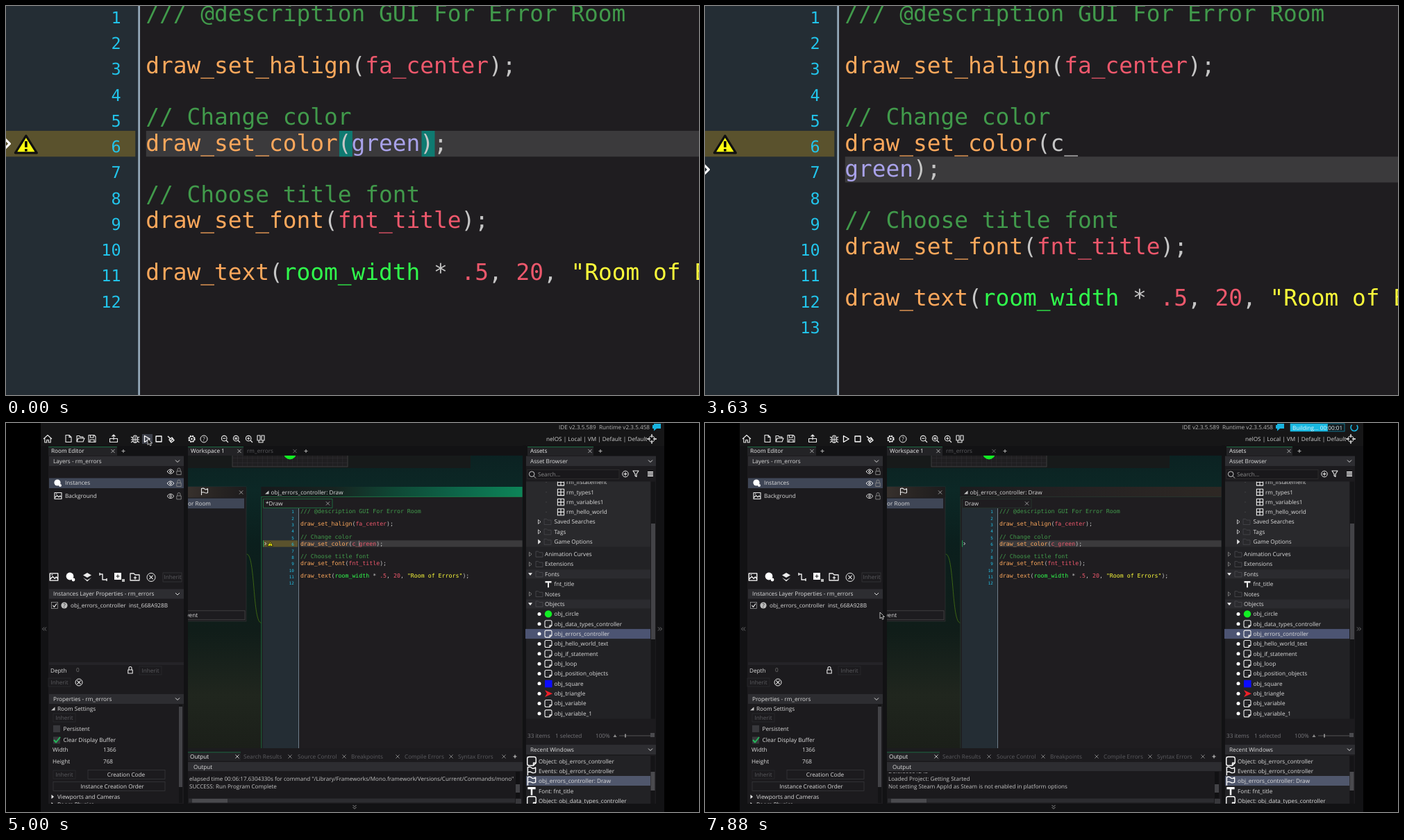
Recreate the animation shown at these times as an HTML page. Size 998 by 561 pixels, loop 8000 ms.

```html
<!DOCTYPE html>
<html lang="en">
<head>
<meta charset="utf-8">
<title>Code editor</title>
<style>
html, body { margin: 0; width: 100%; height: 100%; overflow: hidden; background: #000; }
svg { display: block; width: 998px; height: 561px; }
text { font: 8.2px "Open Sans", sans-serif; fill: #dcdcdc; white-space: pre; text-rendering: geometricPrecision; }
.code text { font: 8.26px "DejaVu Sans Mono", monospace; }
.code .num { font-size: 5.9px; fill: #22c5ec; text-anchor: end; }
.log text { font-size: 8.08px; fill: #c4c4c4; }
</style>
</head>
<body>
<svg id="stage" viewBox="0 0 998 561"></svg>
<script>
const LOOP = 8000, ZOOM = 3.975, PX = 498.7, PY = 165.7;
const ROW = 9.37, COL = 4.973, CODE_X = 424, CODE_Y = 129.65;
const DIM = '#5c5c60', PANEL = '#1c1b1e', HEAD = '#2d2d31', PICK = '#3f4656';

const esc = s => s.replace(/&/g, '&amp;').replace(/</g, '&lt;');
const rect = (x, y, w, h, fill, extra = '') => `<rect x="${x}" y="${y}" width="${w}" height="${h}" fill="${fill}" ${extra}/>`;
const label = (x, y, s, fill = '#dcdcdc', extra = '') => `<text x="${x}" y="${y + 2.9}" style="fill:${fill}" ${extra}>${esc(s)}</text>`;
const mid = (x, y, s, fill) => label(x, y, s, fill, 'text-anchor="middle"');
const icon = (x, y, d, color = '#ececec', w = 1.1, fill = 'none', size = 1) =>
  `<path transform="translate(${x} ${y}) scale(${size})" d="${d}" fill="${fill}" stroke="${color}" stroke-width="${w}" stroke-linejoin="round"/>`;
const solid = (x, y, d, color = '#ececec', size = 1) => icon(x, y, d, 'none', 0, color, size);
const dot = (x, y, r, fill) => `<circle cx="${x}" cy="${y}" r="${r}" fill="${fill}"/>`;
const ring = (x, y, r) => `<circle cx="${x}" cy="${y}" r="${r}" fill="none" stroke="#ececec"/>`;
const box = (x, y, w, h, stroke = '#3a3a3e', fill = 'none') => rect(x, y, w, h, fill, `stroke="${stroke}" stroke-width=".7"`);

const P = {
  close: 'M-2.6-2.6L2.6 2.6M2.6-2.6L-2.6 2.6',
  plus: 'M-2.5 0H2.5M0-2.5V2.5',
  down: 'M-3-1.5L0 1.5L3-1.5',
  open: 'M-3-1.6H3L0 2.2Z',
  shut: 'M-1.5-3L2-0L-1.5 3Z',
  folder: 'M-5 4V-4H-1.5L0-2.4H5V4Z',
  doc: 'M-4-5H1L4-2V5H-4ZM1-5V-2H4',
  disk: 'M-5-5H3L5-3V5H-5ZM-2.5-5V-1.5H2V-5M-3 5V1.5H3V5',
  lens: 'M2 2L5 5M3-.8A3.8 3.8 0 1 1-4.6-.8A3.8 3.8 0 1 1 3-.8',
  eye: 'M-5 0Q0-6.4 5 0Q0 6.4-5 0ZM-1.4 0A1.4 1.4 0 1 0 1.4 0A1.4 1.4 0 1 0-1.4 0',
  lock: 'M-3.2-.5H3.2V4.5H-3.2ZM-2-.5V-3A2 2 0 0 1 2-3V-.5',
  picture: 'M-5-4.5H5V4.5H-5ZM-5 3L-1.5-.5L1 2L3 0L5 2.5M-3-2.6H-1.6',
  grid: 'M-4.6-4.6H4.6V4.6H-4.6ZM0-4.6V4.6M-4.6 0H4.6',
  flag: 'M-4.5 5V-4.5Q-1.5-5.5 0-3.8T4.5-4.2V1.4Q2 2.6 0 1.4T-4.5 1.2',
  object: 'M-5-3Q-5-5-3-5H3Q5-5 5-3V2L2 5H-3Q-5 5-5 3ZM5 2H2V5',
  font: 'M-4.5-4.5H4.5V-2H1V4.8H-1V-2H-4.5Z',
  bubble: 'M-4-5H6V2H0L-4 5.5V2H-6V-3H-4Z'
};

function tab(x, w, s, closeX, active = true) {
  return (active ? rect(x, 34, w, 13, '#232326') + rect(x, 34, w, .8, '#1c7a48') : '') +
    label(x + 4, 40.5, s, active ? '#f0f0f0' : DIM) + icon(closeX, 40.5, P.close, active ? '#bbb' : '#777', .9);
}
function header(x, y, w, s, chevron) {
  return rect(x, y - 7, w, 14, HEAD) + label(x + 6, y, s) + icon(chevron, y, P.down, '#ddd', 1);
}

function toolbar() {
  let s = icon(60, 23, 'M-6 0L0-5.5L6 0M-4.2-1V5H-1.3V1.5H1.3V5H4.2V-1') + icon(90, 22.5, P.doc) +
    icon(107, 22.5, 'M-5 4.5V-4H-1.5L0-2.4H4V-.5M-5 4.5L-3-.5H6L4 4.5Z') + icon(124, 22.5, P.disk) +
    icon(155, 22.5, 'M-5.5 0V5H5.5V0ZM0 2V-5.5M-2.5-3L0-5.5L2.5-3') +
    icon(186, 23, 'M-3-1A3 4 0 0 1 3-1V2A3 3.5 0 0 1-3 2ZM-6-3L-3-1M6-3L3-1M-6 1H6M-6 5L-3 3M6 5L3 3M0-4V5') +
    icon(203, 23, 'M-3.5-4.5L4.2 0L-3.5 4.5Z', '#fff', 1.3) + icon(220, 23, 'M-4-4H4V4H-4Z', '#fff', 1.3) +
    icon(237, 23, 'M-4-4L0 0M-2 1L2-2L5 2L1 5ZM0 3L3 0', '#eee', 1.5);
  s += `<circle cx="267.5" cy="23" r="4.3" fill="none" stroke="#eee" stroke-width="1.8" stroke-dasharray="2.2 1.18"/>` + ring(267.5, 23, 3.6) + dot(267.5, 23, 1.3, '#eee');
  s += ring(285, 23, 5) + mid(285, 23, '?');
  [315, 332, 350].forEach((x, i) => s += icon(x, 23, P.lens) + icon(x - .8, 22.2, ['M-2 0H2', 'M-2-.7H2M-2 .9H2', 'M-2 0H2M0-2V2'][i]));
  s += icon(367, 23, 'M-5-5H-1V2H-5ZM1-5H5V2H1ZM-3 2V5H3V2');
  return s + label(778, 23, 'nelOS | Local | VM | Default | Default', '#cfcfcf') + ring(930, 23, 4.2) +
    icon(930, 23, 'M-7 0H-2M2 0H7M0-7V-2M0 2V7', '#eee', 1.3);
}

function leftPanel() {
  let s = rect(61, 47, 195, 502, PANEL) + tab(61, 99, 'Room Editor', 154) + icon(169, 40.5, P.plus, '#aaa') + header(62, 55, 194, 'Layers - rm_errors', 247);
  s += rect(62, 79.5, 194, 14.5, PICK) + dot(74, 86, 4.6, '#fff') + dot(78, 90, 2, '#fff') + label(85, 86.5, 'Instances') + icon(75, 105, P.picture) + label(85, 105.5, 'Background');
  for (const y of [70, 87, 105.5]) s += icon(237, y, P.eye, '#e4e4e4', 1) + icon(249, y, P.lock, '#8a8a8a', .9);
  s += icon(69, 222, P.picture, '#fff', 1.2, 'none', 1.15) + dot(92, 221, 5.4, '#fff') + dot(97, 226, 2.4, '#fff') +
    solid(117, 222, 'M0-6L6-2.5L0 1L-6-2.5ZM-6 1L0 4.5L6 1L0 6.5Z') + icon(140, 222, 'M-5-4H-1V4H5M-5-6V-2M5 2V6', '#eee', 1.4) +
    rect(156, 216, 10, 10, '#fff') + icon(161, 221, P.plus, '#222') + rect(167, 225, 4, 4, '#bbb') +
    icon(186, 222, 'M-7 5V-5H-2L0-3H6V5ZM0-1V3.5M-2.2 1.2H2.2', '#eee', 1.3) + ring(209, 222.5, 6) + icon(209, 222.5, P.close);
  s += box(226, 216, 27, 13) + mid(240, 222.5, 'Inherit', DIM);
  s += header(62, 246.5, 194, 'Instances Layer Properties - rm_errors', 247) + box(65.5, 258.5, 9, 9, '#aaa') + icon(70, 263, 'M-2.5 0L-.5 2.3L3-2.5', '#fff') +
    dot(84, 263, 4.6, '#bdbdbd') + mid(84, 263, '?', '#222') + label(93, 263, 'obj_errors_controller  inst_668A928B');
  s += rect(62, 345, 194, 4, '#242327') + label(64, 357, 'Depth') + label(101, 356.5, '0', '#777') + icon(179, 356.5, P.lock);
  [[208, 357], [77, 374], [84, 425], [84, 507]].forEach(([x, y]) => s += box(x - 16, y - 6, 32, 12, '#2c2c30') + mid(x, y, 'Inherit', DIM));
  s += ring(105, 374, 5) + icon(105, 374, P.close) + header(62, 398, 194, 'Properties - rm_errors', 247);
  s += icon(68, 412, 'M2.5-2.5V2.5H-3Z', 'none', 0, '#c4c4c4') + label(74, 412, 'Room Settings') + rect(68, 436, 10, 10, '#38383c') + label(82.5, 441, 'Persistent') +
    rect(68, 452.5, 10, 10, '#38383c') + icon(73, 457, 'M-4 0L-1 3.5L5-4', '#25b85a', 2) + label(82.5, 457.5, 'Clear Display Buffer') +
    label(67, 471, 'Width') + label(140, 471, '1366') + label(67, 488, 'Height') + label(140, 488, '768');
  s += box(118, 500.5, 111, 13) + mid(173, 507, 'Creation Code') + box(68, 517.5, 161, 13) + mid(153, 524, 'Instance Creation Order');
  s += solid(67, 539, P.shut) + label(74, 539, 'Viewports and Cameras') + `<g clip-path="url(#leftClip)">${solid(67, 550, P.shut)}${label(74, 550, 'Room Physics')}</g>`;
  return s + rect(249, 406, 5, 142, '#141416') + rect(249, 409, 5, 116, '#434347');
}

function rightPanel() {
  let s = rect(749, 47, 187, 502, PANEL) + tab(751, 95, 'Assets', 841) + icon(856, 40.5, P.plus, '#aaa') + header(749, 55, 187, 'Asset Browser', 928);
  s += box(751, 67.5, 132, 13, '#333', '#19181b') + icon(758, 74.5, P.lens, '#ddd', .9) + label(766, 74.5, 'Search...', '#8a8a8a') + ring(892, 73.5, 4.3) +
    icon(892, 73.5, P.plus) + icon(907, 73, 'M-4-4H4L1 .5V4.5L-1 3V.5Z') + icon(928, 73.5, 'M-4-2.8H4M-4 0H4M-4 2.8H4', '#fff', 1.5);
  s += rect(749, 84.5, 179, 342, '#222225') + rect(749, 84.5, 179, 94, '#29292c');
  let tree = '';
  ['rm_ifstatement', 'rm_types1', 'rm_variables1', 'rm_hello_world'].forEach((n, i) => {
    const y = 85.5 + i * 14.3;
    tree += dot(778, y, .5, '#666') + icon(799, y, P.grid) + label(807, y, n);
  });
  ['Saved Searches', 'Tags', 'Game Options'].forEach((n, i) => {
    const y = 142.5 + i * 14.4;
    tree += icon(768, y, P.shut, '#ddd', .8, i > 1 ? '#ddd' : 'none') + icon(780, y, P.folder, '#454549', .9) + label(789.5, y, n);
  });
  ['Animation Curves', 'Extensions', 'Fonts', '', 'Notes', 'Objects'].forEach((n, i) => {
    const y = 189.2 + i * 14.35, open = i === 2 || i === 5;
    if (!n) return;
    if (open) tree += rect(749, y - 6.5, 179, 13, '#2b2b2f');
    tree += (open ? solid(755, y, P.open) : icon(755, y, P.shut, '#888', .8)) + icon(768, y, P.folder, '#48484c', .9) + label(776, y, n);
  });
  tree += solid(781, 232.5, P.font) + label(789.5, 232.5, 'fnt_title');
  ['circle', 'data_types_controller', 'errors_controller', 'hello_world_text', 'if_statement', 'loop', 'position_objects', 'square', 'triangle', 'variable', 'variable_1'].forEach((n, i) => {
    const y = 275.4 + i * 14.35;
    if (i === 2) tree += rect(748, y - 7, 180, 14, '#4c5472');
    tree += dot(768, y, 2.5, '#fff');
    if (n === 'circle') tree += dot(781, y, 5.2, '#12ee24');
    else if (n === 'square') tree += rect(776, y - 5, 10.5, 10.5, '#0c0cff');
    else if (n === 'triangle') tree += solid(781, y, 'M-5-5L6 0L-5 5L-2 0Z', '#ee2028');
    else tree += icon(781, y, P.object, '#f0f0f0', 1.1);
    tree += label(789.5, y, 'obj_' + n);
  });
  s += `<g clip-path="url(#treeClip)">${tree}</g>` + rect(929, 84.5, 6, 342, '#141416') + rect(929, 145, 6, 167, '#434347');
  s += label(751, 451, '33 items', '#77777b') + label(791, 451, '1 selected', '#77777b') + label(849, 451, '100%', '#77777b') +
    icon(877, 451, 'M0-2L2.5 2H-2.5Z', 'none', 0, '#888') + rect(883, 450.5, 47, 1, '#555') + rect(891, 448.5, 2, 5, '#888') + rect(928, 447, 6, 6, '#4a4a4e');
  s += header(749, 471, 187, 'Recent Windows', 928) + rect(749, 480, 179, 69, '#222225') + rect(749, 509, 179, 14, '#50576c');
  let recent = '';
  [['object', 'Object: obj_errors_controller'], ['flag', 'Events: obj_errors_controller'], ['flag', 'obj_errors_controller: Draw'], ['font', 'Font: fnt_title'], ['object', 'Object: obj_data_types_controller']]
    .forEach(([k, n], i) => {
      const y = 487.8 + i * 14.3;
      recent += (k === 'font' ? solid(757, y, P.font, '#fff', 1.25) : icon(757, y, P[k], '#fff', 1.1, 'none', 1.25)) + label(767, y, n);
    });
  return s + `<g clip-path="url(#leftClip)">${recent}</g>` + rect(928.5, 480, 6, 69, '#141416') + rect(928.5, 503, 6, 27, '#4a4a4e');
}

function centre() {
  let s = rect(262, 47, 482, 422, 'url(#scene)');
  s += `<g clip-path="url(#workClip)">` + rect(262, 47, 407, 18, '#171a1a') + box(326, 40, 166, 23, '#4a4a4a', '#201f21');
  for (let i = 1; i < 23; i++) s += rect(326 + i * 7.2, 47, .35, 16, '#383639');
  s += rect(326, 50, 166, .35, '#383639') + rect(326, 57, 166, .35, '#383639') + dot(409, 43.5, 9, '#12ee24');
  s += rect(255, 92, 91, 194, '#1d1c1f', 'stroke="#343638" stroke-width=".6"') + rect(255, 92, 91, 15.5, 'url(#warm)') + rect(255, 108.7, 88, 14.5, PICK) +
    label(262, 116.5, 'or Room') + icon(286, 99, P.flag) + icon(338.6, 100, P.close, '#aaa', .9) + box(255, 270.8, 89, 12.9, '#4a4a4a') + label(259.5, 277.5, 'vent');
  s += `<path d="M346.7 189.2C359 189.2 355 288.2 367.6 288.2" fill="none" stroke="#4b7a12" stroke-width=".75"/></g>`;
  s += rect(367.6, 92, 376, 377, '#1f1d20') + rect(367.6, 92, 376, 14.3, 'url(#idle)') + `<g id="glow">${rect(367.6, 92, 376, 14.3, 'url(#green)')}</g>` +
    solid(376, 100, 'M2.5-2.5V2.5H-3Z', '#c4c4c4') + label(381.5, 100.5, 'obj_errors_controller: Draw') +
    `<g id="frame" fill="none" stroke-width=".6"><path d="M743.5 106.4H367.8V469"/><path d="M370.5 122.4V109.6H470V122.4H370.5"/></g>` +
    icon(463.5, 116, P.close, '#c4c4c4', .7) + `<g id="tabName"></g>`;
  s += rect(370, 123, 51.5, 346, '#242d34') + `<g id="code" class="code"></g>` + rect(421.1, 123, .7, 346, '#93a8b8');
  s += rect(744, 32, 5, 520, '#121214') + rect(262, 469, 482, 80, PANEL);
  s += tab(262, 80, 'Workspace 1', 336) + tab(343, 80, 'rm_errors', 416, false) + icon(432, 40.5, P.plus, '#aaa');
  s += rect(262, 475, 76, 12, '#232326') + rect(262, 474.5, 76, .8, '#1c7a48');
  [['Output', 265, 333], ['Search Results', 342, 409], ['Source Control', 420, 487], ['Breakpoints', 497, 564], ['Compile Errors', 574, 641], ['Syntax Errors', 651, 717]]
    .forEach(([n, x, c], i) => s += label(x, 481, n, i ? DIM : '#f0f0f0') + icon(c, 481, P.close, i ? '#888' : '#ccc', .9));
  s += icon(733, 481, P.plus, '#ccc') + rect(262, 489, 482, 13, HEAD) + label(270, 496, 'Output') + rect(262, 502, 482, 47, '#1b1a1d');
  s += `<g id="log" class="log" clip-path="url(#logClip)"></g>` + rect(734, 503, 6, 38, '#111113') + rect(734, 521, 6, 12, '#434347') + rect(734, 542, 8, 7, '#38383c') + rect(263, 541.5, 470, 6, '#2c2c30') + rect(268, 542, 51, 5.5, '#4a4a4e');
  return s;
}

const clip = (id, x, y, w, h) => `<clipPath id="${id}">${rect(x, y, w, h, '#fff')}</clipPath>`;
const grad = (id, dir, stops) => `<linearGradient id="${id}" x2="${dir ? 0 : 1}" y2="${dir}">` +
  stops.map(([o, c]) => `<stop offset="${o}" stop-color="${c}"/>`).join('') + '</linearGradient>';

const $ = id => document.getElementById(id);
$('stage').innerHTML = '<defs>' + clip('leftClip', 50, 400, 900, 149) + clip('treeClip', 748, 84.5, 180, 342) + clip('workClip', 262, 47, 482, 422) +
  clip('logClip', 263, 504, 469.5, 36) +
  grad('scene', 1, [[0, '#0b2222'], [.12, '#0c2826'], [.3, '#0b1f1d'], [.6, '#101d19'], [.82, '#20261e'], [1, '#1b1f19']]) +
  grad('green', 0, [[0, '#17191b'], [.28, '#172320'], [.5, '#0f4634'], [.75, '#0d6549'], [1, '#0d8558']]) +
  grad('idle', 0, [[0, '#1c1c1e'], [.4, '#242122'], [1, '#2e2824']]) +
  grad('warm', 0, [[0, '#3a332f'], [.5, '#292523'], [1, '#1d1c1d']]) + '</defs>' +
  rect(0, 0, 998, 561, '#000') + '<g id="world">' + rect(50, 0, 898, 561, '#121214') + rect(50, 0, 898, 33, '#161617') +
  '<g id="hover">' + rect(196, 16, 15, 14, '#3c3f49') + '</g>' + toolbar() + '<g id="status"></g>' + centre() + leftPanel() + rightPanel() +
  icon(55, 297, 'M0-2.5L-2.5 0L0 2.5M3-2.5L.5 0L3 2.5', '#888', .8) + icon(942, 297, 'M0-2.5L2.5 0L0 2.5M-3-2.5L-.5 0L-3 2.5', '#888', .8) +
  icon(502, 554, 'M-2.5-3L0-.5L2.5-3M-2.5 0L0 2.5L2.5 0', '#aaa', .8) +
  '<g id="mouse"></g></g>';

const INK = { f: '#fda85c', a: '#ee586c', p: '#c6c6c6', c: '#419a4b', v: '#a9a2ea', g: '#30fb4c', s: '#fbfb3a' };

// Each line is a list of [ink, text] pairs.
function codeLines(typed, split) {
  const call = (name, ...args) => [['f', name], ['p', '('], ...args, ['p', ');']];
  const word = typed + 'green';
  const colour = split
    ? [[['f', 'draw_set_color'], ['p', '(c_']], [['v', 'green'], ['p', ');']]]
    : [call('draw_set_color', [word === 'c_green' ? 'a' : 'v', word])];
  return [[['c', '/// @description GUI For Error Room']], [], call('draw_set_halign', ['a', 'fa_center']), [],
    [['c', '// Change color']], ...colour, [], [['c', '// Choose title font']], call('draw_set_font', ['a', 'fnt_title']), [],
    call('draw_text', ['g', 'room_width'], ['p', ' * '], ['a', '.5'], ['p', ', '], ['a', '20'], ['p', ', '], ['s', '"Room of Errors"']), []];
}

function drawCode(typed, split, match, warn, caret, edited) {
  const rowTop = r => 169.3 + (r - 5) * ROW, active = split ? 6 : 5, y = rowTop(active);
  let s = rect(CODE_X, y, 319.6, ROW, '#3b3a3c');
  if (warn) s += rect(370, rowTop(5), 50.1, ROW, '#5a522d');
  if (edited) s += rect(370, y, 1.1, ROW, '#1f9a50');
  if (match) for (const c of [14, 20]) s += rect(CODE_X + .35 + c * COL, y, COL - .2, ROW, '#0f7a71');
  if (warn) s += icon(380.5, rowTop(5) + 5, 'M0-3.2L3.9 3H-3.9Z', '#111', .8, '#ffff10') + icon(380.5, rowTop(5) + 5, 'M0-1.2V1M0 1.6V2.4', '#000', .9);
  s += icon(372.6, y + 4.7, 'M0-2L2 0L0 2', '#fff', .8);
  codeLines(typed, split).forEach((line, i) => {
    s += `<text class="num" x="414.9" y="${130.3 + i * ROW}">${i + 1}</text>`;
    if (line.length) s += `<text x="${CODE_X - .1}" y="${CODE_Y + i * ROW}">` + line.map(([k, v]) => `<tspan fill="${INK[k]}">${v}</tspan>`).join('') + '</text>';
  });
  if (caret) s += rect(CODE_X + (split ? 0 : (15 + typed.length) * COL), y + .4, .45, ROW - .8, '#e4e4e4');
  return s;
}

const LOGS = [
  ['', 'elapsed time 00:06:17.6304330s for command "/Library/Frameworks/Mono.framework/Versions/Current/Commands/mono"', 'SUCCESS: Run Program Complete'],
  ['Setting up the Asset compiler.', '/Users/Shared/GameMakerStudio2/Cache/runtimes/runtime-2.3.5.458/bin/GMAssetCompiler.exe  /c /mv=1 /zpex /iv=0 /rv=0 /j=8', 'config/GameMakerStudio2/Cache/GMS2CACHE/Getting_St_4A5739C1_807C5ABD"'],
  ['DoIt::00001243', 'Loaded Project: Getting Started', 'Not setting Steam AppId as Steam is not enabled in platform options']
];

function drawStatus(t, busy) {
  const x = busy ? 687 : 796;
  let s = label(x, 6.3, 'IDE v2.3.5.589  Runtime v2.3.5.458', '#b4b4b4') + solid(x + 141, 6, P.bubble, '#18b4e0');
  if (!busy) return s;
  const part = .12 + .57 * (t - 5250) / 2630;
  const sec = t < 7250 ? Math.floor((t - 5250) / 280) : Math.floor((t - 7250) / 420);
  s += box(843, 1, 78, 11, '#159dc2', '#121a1e') + rect(843, 1, 78 * part, 11, '#18b9e2') +
    label(846, 6.6, 'Building... 00:00:0' + sec, '#e6f4f8');
  return s + `<circle cx="935" cy="6.5" r="5" fill="none" stroke="#18b4e0" stroke-width="1.6" stroke-dasharray="23 8.4" transform="rotate(${t * .36} 935 6.5)"/>`;
}

const clamp = v => Math.min(1, Math.max(0, v));
const ease = v => v * v * (3 - 2 * v);
const phase = (t, a, b) => ease(clamp((t - a) / (b - a)));
const mix = (a, b, k) => a + (b - a) * k;

const IBEAM = icon(0, 0, 'M-10-17H-5Q0-17 0-12V12Q0 17-5 17H-10M10-17H5Q0-17 0-12M0 12Q0 17 5 17H10M-5 7H5', '#fff', 7) +
  icon(0, 0, 'M-9-17H-5Q0-17 0-12V12Q0 17-5 17H-9M9-17H5Q0-17 0-12M0 12Q0 17 5 17H9M-4 7H4', '#111', 2.8);
const ARROW = icon(0, 0, 'M0 0V9L2.1 7.1L3.6 10.3L5.2 9.6L3.8 6.5H6.4Z', '#e8e8e8', .8, '#0a0a0a');

function drawMouse(t) {
  if (t >= 380 && t < 2130) {
    const k = phase(t, 380, 1130);
    return `<g transform="translate(${mix(640, 498.2, k)} ${mix(205, 176.9, k)}) scale(${1 / ZOOM})">${IBEAM}</g>`;
  }
  if (t < 4750) return '';
  const a = phase(t, 4700, 4990), b = phase(t, 5250, 6000);
  return `<g transform="translate(${mix(mix(300, 204, a), 252, b)} ${mix(mix(85, 22.5, a), 273, b)})">${ARROW}</g>`;
}

const cache = {};
function put(id, html) {
  if (cache[id] !== html) $(id).innerHTML = cache[id] = html;
}

function render(t) {
  const z = mix(ZOOM, 1, phase(t, 4500, 5000));
  $('world').setAttribute('transform', `translate(${PX * (1 - z)} ${PY * (1 - z)}) scale(${z})`);
  const busy = t >= 5250, split = t >= 2750 && t < 3880;
  const typed = t < 2130 ? '' : t < 2380 ? 'c' : 'c_';
  const last = [3880, 2750, 2380, 2130, 1250].find(a => t >= a);
  const caret = last !== undefined && !busy && (t - last) % 1060 < 530;
  put('code', drawCode(typed, split, t < 1250, t < 7000, caret, t >= 3880));
  put('tabName', label(374, 116, busy ? 'Draw' : '*Draw'));
  put('log', LOGS[t < 5880 ? 0 : t < 7000 ? 1 : 2].map((s, i) => label(264, 502.4 + i * 10.9, s, '#c4c4c4')).join(''));
  put('status', drawStatus(t, busy));
  put('mouse', drawMouse(t));
  $('glow').setAttribute('opacity', 1 - phase(t, 5130, 5500));
  $('frame').setAttribute('stroke', busy ? '#2c4438' : '#1f9a55');
  $('hover').setAttribute('opacity', t >= 4900 && t < 5380 ? 1 : 0);
}

function tick(now) {
  render(now % LOOP);
  requestAnimationFrame(tick);
}
render(0);
requestAnimationFrame(tick);
</script>
</body>
</html>
```
